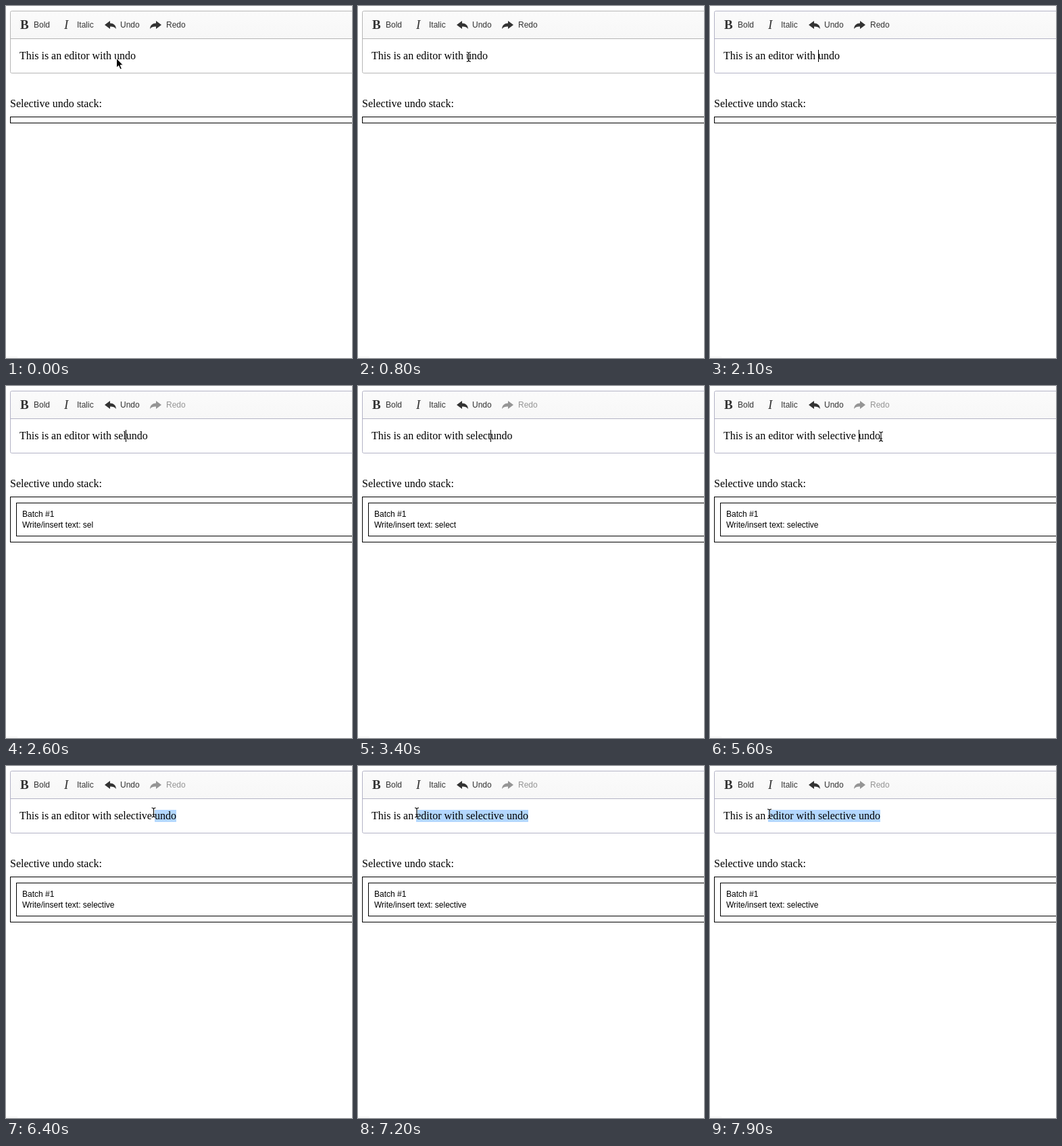
These frames come from a looping animation (512x522 px, 8000 ms). An HTML page:

```html
<!DOCTYPE html>
<html lang="en">
<head>
<meta charset="utf-8">
<title>Selective undo</title>
<style>
  html, body { margin: 0; width: 100%; height: 100%; overflow: hidden; background: #fff; }
  svg { display: block; }
  text { white-space: pre; }
  .serif { font: 16px "Liberation Serif", Times, serif; }
  .sans { font: 12px "Liberation Sans", Arial, sans-serif; }
  .frame { fill: none; stroke: #b6b6b6; }
  .focus .frame { stroke: #b3b3c6; }
  .tools { fill: #333; }
  .box { fill: none; stroke: #000; }
  .off { opacity: .5; }
</style>
</head>
<body>
<svg id="stage" width="512" height="522" viewBox="0 0 512 522">
  <defs>
    <linearGradient id="bar" x2="0" y2="1">
      <stop stop-color="#fbfbfb"/><stop offset="1" stop-color="#f7f7f7"/>
    </linearGradient>
    <path id="arrow" d="M0 6L8 0V3.6C13 3.7 16.6 6.5 17 12C14.5 9 12 8.3 8 8.5V12Z"/>
  </defs>

  <path d="M7 8H512V48H7Z" fill="url(#bar)"/>
  <rect class="frame" x="6.5" y="7.5" width="540" height="92" rx="2"/>
  <path class="frame" d="M7 48.5H512"/>

  <g class="tools sans">
    <text x="21" y="34" style="font:bold 19px 'Liberation Serif',serif">B</text>
    <text x="41" y="32">Bold</text>
    <text x="86" y="34" style="font:italic 19px 'Liberation Serif',serif">I</text>
    <text x="105" y="32">Italic</text>
    <use href="#arrow" x="146" y="22"/>
    <text x="169" y="32">Undo</text>
    <g id="redo">
      <use href="#arrow" transform="translate(230 22) scale(-1 1)"/>
      <text x="237" y="32">Redo</text>
    </g>
  </g>

  <rect id="mark" y="65" height="18" fill="#b3d7ff"/>
  <text id="line" class="serif" x="20" y="79"></text>
  <rect id="caret" y="65" width="1" height="18"/>

  <text class="serif" x="6" y="150">Selective undo stack:</text>
  <rect id="stack" class="box" x="6.5" y="164.5" width="540" height="9"/>
  <g id="batch" class="sans">
    <rect class="box" x="15.5" y="173.5" width="540" height="49"/>
    <text x="24" y="194">Batch #1</text>
    <text id="entry" x="24" y="210"></text>
  </g>
  <path d="M0 520.5H17" stroke="#f3f3f3"/>

  <path id="hand" d="M.5 .5V14.5L3.7 11.6L6 17L8.4 16L6.1 10.8H10.3Z" stroke="#fff" stroke-linejoin="round"/>
  <g id="beam" fill="none">
    <path d="M-3 -7Q0 -7 0 -4.500V4.500Q0 7 -3 7M3 -7Q0 -7 0 -4.500M0 4.500Q0 7 3 7M-2 3H2" stroke="#fff" stroke-width="2.500" stroke-opacity=".7"/>
    <path d="M-3 -7Q0 -7 0 -4.500V4.500Q0 7 -3 7M3 -7Q0 -7 0 -4.500M0 4.500Q0 7 3 7M-2 3H2" stroke="#000" stroke-width="1.100"/>
  </g>
</svg>
<script>
const LOOP = 8000, STEP = 100;
const HEAD = "This is an editor with ", TAIL = "undo", WORD = "selective ";
const keyTimes = [2200, 2300, 2600, 2900, 3200, 3400, 3600, 3900, 4300, 4600];
const FOCUS = 1000, HIDE = 2000, SHOW = 5400, PRESS = 6200;

// Pointer path: time, x, y
const path = [
  [0, 163, 77], [400, 163, 77], [500, 166, 77], [900, 163, 75],
  [1200, 163, 75], [1600, 181, 77], [HIDE, 181, 77],
  [SHOW, 265, 78], [5600, 253, 75], [PRESS, 253, 74],
  [6300, 246, 72], [6400, 218.5, 69], [6700, 152, 65],
  [7000, 92, 68], [7200, 87, 69], [7600, 87.5, 70], [7900, 88, 71]
];

const $ = id => document.getElementById(id);
const [stage, redo, mark, line, caret, stack, batch, entry, hand, beam] =
  ["stage", "redo", "mark", "line", "caret", "stack", "batch", "entry", "hand", "beam"].map($);
const show = (el, on) => el.setAttribute("visibility", on ? "visible" : "hidden");

function pointerAt(t) {
  const i = path.findIndex(p => p[0] > t);
  if (i < 0) return path[path.length - 1].slice(1);
  const a = path[i - 1], b = path[i], k = (t - a[0]) / (b[0] - a[0]);
  return [1, 2].map(n => a[n] + (b[n] - a[n]) * k);
}

function edge(i) {
  return i < line.textContent.length
    ? line.getStartPositionOfChar(i).x
    : line.getEndPositionOfChar(i - 1).x;
}

function nearestEdge(x) {
  let best = edge(0);
  for (let i = 1; i <= line.textContent.length; i++) {
    const e = edge(i);
    if (Math.abs(e - x) < Math.abs(best - x)) best = e;
  }
  return best;
}

function caretOn(t) {
  if (t < FOCUS || t > PRESS) return false;
  if (t < HIDE) return t < FOCUS + 500;
  return t < 4500 || (t - 4500) % 1000 < 500;
}

function draw(t) {
  const typed = WORD.slice(0, keyTimes.filter(k => k <= t).length);
  const dirty = typed.length > 0;
  line.textContent = HEAD + typed + TAIL;
  entry.textContent = "Write/insert text: " + typed;
  stage.classList.toggle("focus", t >= FOCUS);
  redo.classList.toggle("off", dirty);
  show(batch, dirty);
  stack.setAttribute("height", dirty ? 67 : 9);

  const [x, y] = pointerAt(t);
  const present = t < HIDE || t >= SHOW;
  const isBeam = t >= 500;
  show(hand, present && !isBeam);
  show(beam, present && isBeam);
  (isBeam ? beam : hand).setAttribute("transform", `translate(${x} ${y})`);

  const end = edge(line.textContent.length);
  const atPress = t >= PRESS;
  show(caret, caretOn(t));
  caret.setAttribute("x", Math.floor((atPress ? end : edge(HEAD.length + typed.length)) + .1));

  const from = Math.round(atPress ? nearestEdge(x) : end);
  mark.setAttribute("x", from);
  mark.setAttribute("width", Math.max(0, Math.round(end) - from));
}

const start = performance.now();
function tick() {
  const t = (performance.now() - start) % LOOP;
  draw(Math.floor(t / STEP) * STEP);
  requestAnimationFrame(tick);
}
tick();
</script>
</body>
</html>
```
